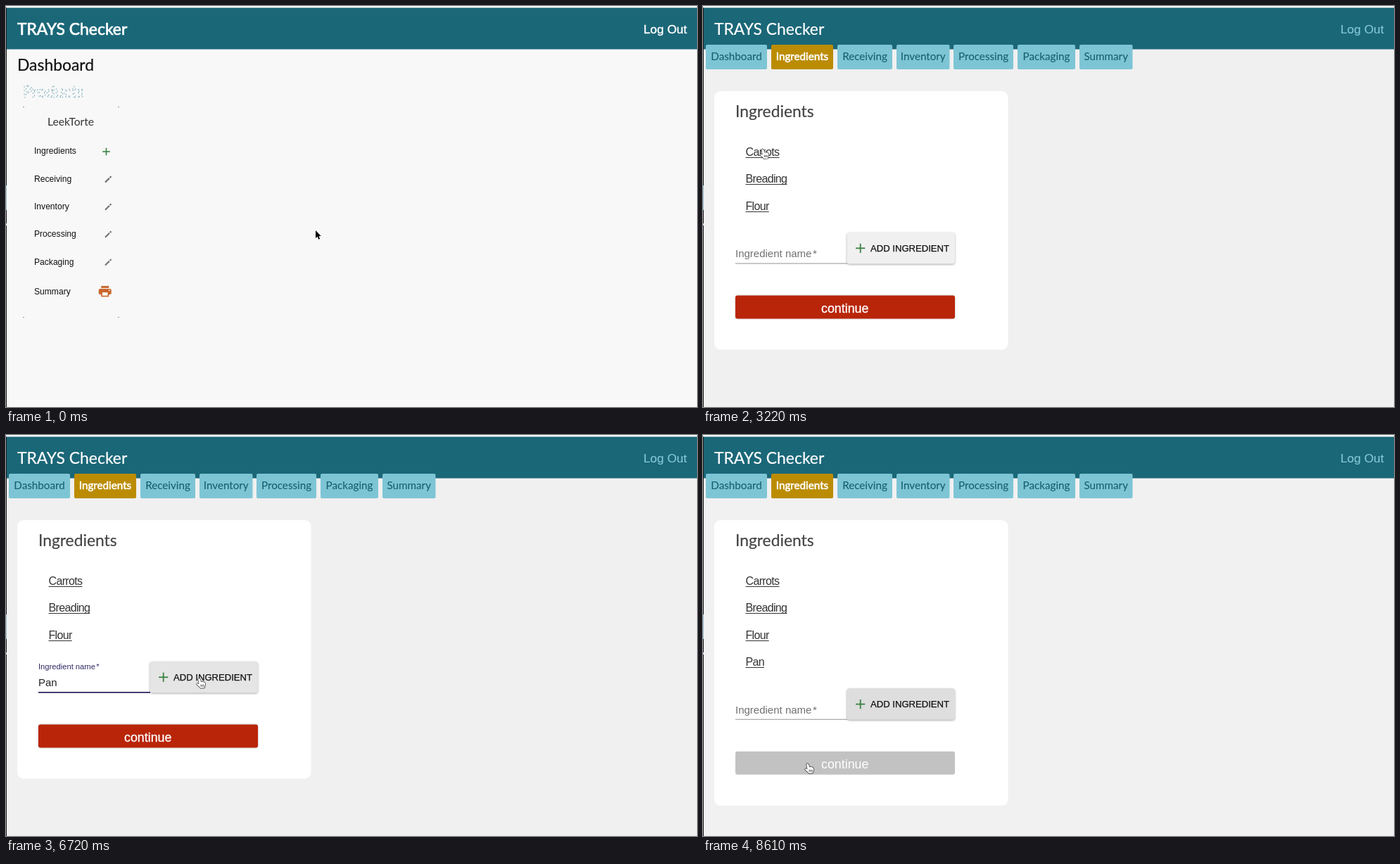
An HTML page with a canvas that plays this animation: 982 by 570 pixels, repeating every 8.68 s.

```html
<!DOCTYPE html>
<html lang="en">
<head>
<meta charset="utf-8">
<title>Planner</title>
<style>
html, body { margin: 0; width: 100%; height: 100%; overflow: hidden; }
canvas { display: block; }
</style>
</head>
<body>
<canvas id="stage" width="982" height="570"></canvas>
<script>
const c = document.getElementById('stage').getContext('2d');
const LOOP = 8680;
const LATO = 'Lato, sans-serif', SANS = '"Liberation Sans", Arial, sans-serif';
const TEAL = '#1a6778', GREEN = '#3a8240';

// Moments at which the interface changes, in ms
const HOVER = 560, OPEN = 3010, FOCUS = 4690, PRESS = 7160, ADDED = 7400;
const KEYS = [5530, 5800, 6020];

// Pointer path: time, x, y
const PATH = [
  [0, 440, 319], [140, 440, 319], [980, 105, 205], [1260, 102.6, 204],
  [1900, 102.6, 204], [2500, 85.2, 203.2], [3360, 85.2, 203.2], [4200, 183, 336],
  [4340, 183, 336], [4680, 155, 347], [6300, 155, 347], [6620, 275, 346],
  [7560, 275, 346], [8420, 149, 467]
];

const clamp = v => Math.max(0, Math.min(1, v));
const ease = v => { v = clamp(v); return v * v * (3 - 2 * v); };
const mix = (a, b, k) => a + (b - a) * k;

function pointer(t) {
  let i = PATH.findIndex(p => p[0] > t);
  if (i < 0) return PATH[PATH.length - 1].slice(1);
  const [t0, x0, y0] = PATH[i - 1], [t1, x1, y1] = PATH[i];
  const k = ease((t - t0) / (t1 - t0));
  return [mix(x0, x1, k), mix(y0, y1, k)];
}

function box(x, y, w, h, color, r = 0) {
  c.fillStyle = color;
  c.beginPath();
  c.roundRect(x, y, w, h, r);
  c.fill();
}

function shadowBox(x, y, w, h, color, r, blur, drop, alpha) {
  c.save();
  c.shadowColor = `rgba(0,0,0,${alpha})`;
  c.shadowBlur = blur;
  c.shadowOffsetY = drop;
  box(x, y, w, h, color, r);
  c.restore();
}

function line(points, color, width) {
  c.strokeStyle = color;
  c.lineWidth = width;
  c.beginPath();
  points.forEach(p => c.lineTo(...p));
  c.stroke();
}

// "heavy" thickens the letters without changing their widths
function text(s, x, y, size, color, font = SANS, heavy = 0, align = 'left') {
  c.font = `${size}px ${font}`;
  c.textAlign = align;
  c.fillStyle = color;
  c.fillText(s, x, y);
  if (heavy) {
    c.strokeStyle = color;
    c.lineWidth = heavy;
    c.strokeText(s, x, y);
  }
}

function brokenText(s, x, y, size, color, dash, align = 'left') {
  c.save();
  c.font = `${size}px ${LATO}`;
  c.textAlign = align;
  c.strokeStyle = color;
  c.lineWidth = 0.6;
  c.setLineDash(dash);
  c.strokeText(s, x, y);
  c.restore();
}

function plus(x, y, r, color, w) {
  line([[x - r, y], [x + r, y]], color, w);
  line([[x, y - r], [x, y + r]], color, w);
}

function pencil(x, y) {
  line([[x - 4, y + 4], [x + 2, y - 2]], '#737373', 2.2);
  line([[x + 2.8, y - 2.8], [x + 4.4, y - 4.4]], '#737373', 2.4);
}

function printer(x, y) {
  const o = '#c9662c';
  box(x - 5.5, y - 7.7, 11, 3, o);
  box(x - 9, y - 3.7, 18, 8.2, o, 2);
  box(x - 5.5, y + 0.5, 11, 7.2, o);
  box(x - 3.8, y + 1.5, 7.6, 4.6, '#fff');
  box(x + 5.3, y - 2.2, 1.6, 1.6, '#fff');
}

function shape(points, fill, edge, width) {
  c.beginPath();
  points.forEach(p => c.lineTo(...p));
  c.closePath();
  c.lineJoin = 'round';
  c.strokeStyle = edge;
  c.lineWidth = width;
  c.stroke();
  c.fillStyle = fill;
  c.fill();
}

const CURSORS = {
  arrow() {
    shape([[0, 0], [0, 11], [2.5, 8.8], [4.3, 12.8], [6.2, 12], [4.5, 8.2], [7.7, 8]],
      '#000', '#fff', 1.4);
  },
  hand() {
    shape([[-2, 1], [-0.5, 0], [1, 1], [2.2, 5], [4, 4.5], [5.5, 5.2], [7, 5.4],
      [8, 7], [8, 10], [7, 13.5], [1.5, 13.8], [-1, 11.2], [-4, 8.5], [-3.2, 7], [-0.6, 8]],
      '#fff', '#222', 1.3);
    for (const x of [2, 4, 6]) line([[x, 8.7], [x + 0.2, 11.8]], '#222', 0.8);
  },
  beam() {
    line([[-3, -6.5], [-0.8, -6], [0, -5], [0, 5], [-0.8, 6], [-3, 6.5]], '#222', 1.1);
    line([[3, -6.5], [0.8, -6], [0, -5]], '#222', 1.1);
    line([[3, 6.5], [0.8, 6], [0, 5]], '#222', 1.1);
    line([[-1.5, 2], [1.5, 2]], '#222', 1);
  }
};

function header(bg, heavy, logColor) {
  box(0, 0, 982, 570, bg);
  box(0, 0, 982, 2.5, '#fff');
  box(0, 2.5, 982, 59.1, TEAL);
  box(0, 2.5, 1, 567.5, '#1c1c1c');
  box(0, 255, 1, 35, '#9fc3d3');
  box(0, 309, 1, 3, '#c8d4d8');
  text('TRAYS Checker', 16, 40.5, 22.9, '#fff', LATO, heavy);
  text('Log Out', 906, 39, 17.3, logColor, SANS, heavy * 0.6);
}

function dashboard(t) {
  const hover = t >= HOVER, dy = hover ? 2.4 : 0;
  header(hover ? '#f7f9f8' : '#f8f8f8', 0.7, '#fff');
  text('Dashboard', 16, 92, 22.9, '#111', LATO, 0.2);
  brokenText('Products', 24, 130, 22.2, '#2f7f92', [2, 3.4]);
  if (hover) text('LeekTorte', 92.5, 171.5, 17, '#86a9bb', `300 ${LATO}`.replace('300 ', ''), 0, 'center');
  else text('LeekTorte', 92, 169.5, 15.6, '#333', LATO, 0, 'center');
  for (const x of [24, 159]) {
    box(x, 143, 2, 1, '#8a9a9d');
    box(x, 442 + dy, 2, 1, '#8a9a9d');
  }
  const rows = [['Ingredients', 206.3], ['Receiving', 246.1], ['Inventory', 285.2],
    ['Processing', 324.3], ['Packaging', 364], ['Summary', 405.6]];
  rows.forEach(([name, y], i) => {
    y += dy;
    text(name, 40, y + 4, 12.1, '#111');
    if (i === 0) plus(142.5, y + 0.7, 5.3, GREEN, 1.6);
    else if (i < 5) pencil(145, y + 0.5);
    else printer(140.7, y);
  });
}

function tabs() {
  const list = [['Dashboard', 4, 87], ['Ingredients', 97, 88], ['Receiving', 191, 78],
    ['Inventory', 275, 75.5], ['Processing', 356, 85], ['Packaging', 447, 82], ['Summary', 535, 75.5]];
  list.forEach(([name, x, w], i) => {
    const on = i === 1;
    box(x, 55, w, 35, on ? '#bb8c02' : '#7dc5d5', 2);
    text(name, x + w / 2, 77.3, 15.2, on ? '#fff' : '#17606f', LATO, on ? 0.6 : 0.1, 'center');
  });
}

function field(t, dy) {
  const floated = t < ADDED ? ease((t - FOCUS) / 300) : 1 - ease((t - ADDED - 30) / 300);
  const focus = t < PRESS ? ease((t - FOCUS) / 300) : 1 - ease((t - PRESS) / 320);
  const size = mix(15, 11.2, floated), y = mix(357.3, 333, floated) + dy;
  const color = t >= FOCUS && t < PRESS ? '#2f2a63' : '#707070';
  text('Ingredient name', 46, y, size, color);
  text('*', 46 + c.measureText('Ingredient name').width + 1.5, y, size, color);
  box(46, 365.5 + dy, 159, 1, '#949494');
  if (focus > 0) box(125.5 - 79.5 * focus, 365 + dy, 159 * focus, 1.7, '#332c62');
  if (t < ADDED) {
    const typed = 'Pan'.slice(0, KEYS.filter(k => t >= k).length);
    text(typed, 46, 357.3, 15, '#222');
  }
}

function addButton(t, dy) {
  const raised = t >= PRESS && t < 7700;
  const color = t < 6540 ? '#f0f0f0' : t < PRESS ? '#e5e5e5' : raised ? '#d5d5d5' : '#dedede';
  shadowBox(204.5, 322 + dy, 153.5, 44.5, color, 4, raised ? 6 : 3, raised ? 3 : 1, raised ? 0.5 : 0.35);
  if (raised) {
    const grow = ease((t - PRESS - 100) / 400);
    c.save();
    c.beginPath();
    c.roundRect(204.5, 322 + dy, 153.5, 44.5, 4);
    c.clip();
    c.fillStyle = `rgba(0,0,0,${0.11 * (1 - clamp((t - 7500) / 200))})`;
    c.beginPath();
    c.arc(273.5, 346 + dy, 4 + 26 * grow, 0, 7);
    c.fill();
    c.restore();
  }
  plus(223.7, 344.3 + dy, 6.6, GREEN, 1.8);
  text('ADD INGREDIENT', 238, 348.6 + dy, 13.1, '#111', SANS, 0.25);
}

function ingredients(t, y) {
  const added = t >= ADDED, dy = added ? 38.3 : 0;
  header(added ? '#f1f1f1' : '#f0f0f0', 0.2, '#85c8d8');
  tabs();
  box(16, 121, 417.5, 367.5 + dy, '#fff', 9);
  text('Ingredients', 46, 158, 22.8, '#444', LATO, 0.2);
  c.letterSpacing = '-0.65px';
  ['Carrots', 'Breading', 'Flour', 'Pan'].slice(0, added ? 4 : 3).forEach((name, i) => {
    const base = 213 + i * 38.3;
    text(name, 60.5, base, 16, '#333');
    box(60.5, Math.round(base + 2), c.measureText(name).width, 1, '#333');
  });
  c.letterSpacing = '0px';
  field(t, dy);
  addButton(t, dy);
  const over = added && y > 449;
  if (over) box(46, 411.5 + dy, 312, 33, '#c2c2c2', 3);
  else shadowBox(46, 411.5 + dy, 312, 33, '#b92508', 3, 3, 0, 0.25);
  text('continue', 201.7, 436 + dy, 17.8, '#fff', SANS, over ? 0 : 0.3, 'center');
}

function cursorKind(t, x, y) {
  if (t < OPEN) return x < 160 && y < 240 ? 'hand' : 'arrow';
  if (t >= ADDED) return y > 449 ? 'hand' : 'arrow';
  if (x > 204 && y > 322) return 'hand';
  if (t > 4340 && y > 337) return 'beam';
  return y < 218 ? 'hand' : 'arrow';
}

function draw(t) {
  const [x, y] = pointer(t);
  if (t < OPEN) dashboard(t);
  else ingredients(t, y);
  c.save();
  c.translate(x, y);
  CURSORS[cursorKind(t, x, y)]();
  c.restore();
}

const start = performance.now();
function tick() {
  draw((performance.now() - start) % LOOP);
  requestAnimationFrame(tick);
}
tick();
</script>
</body>
</html>
```
